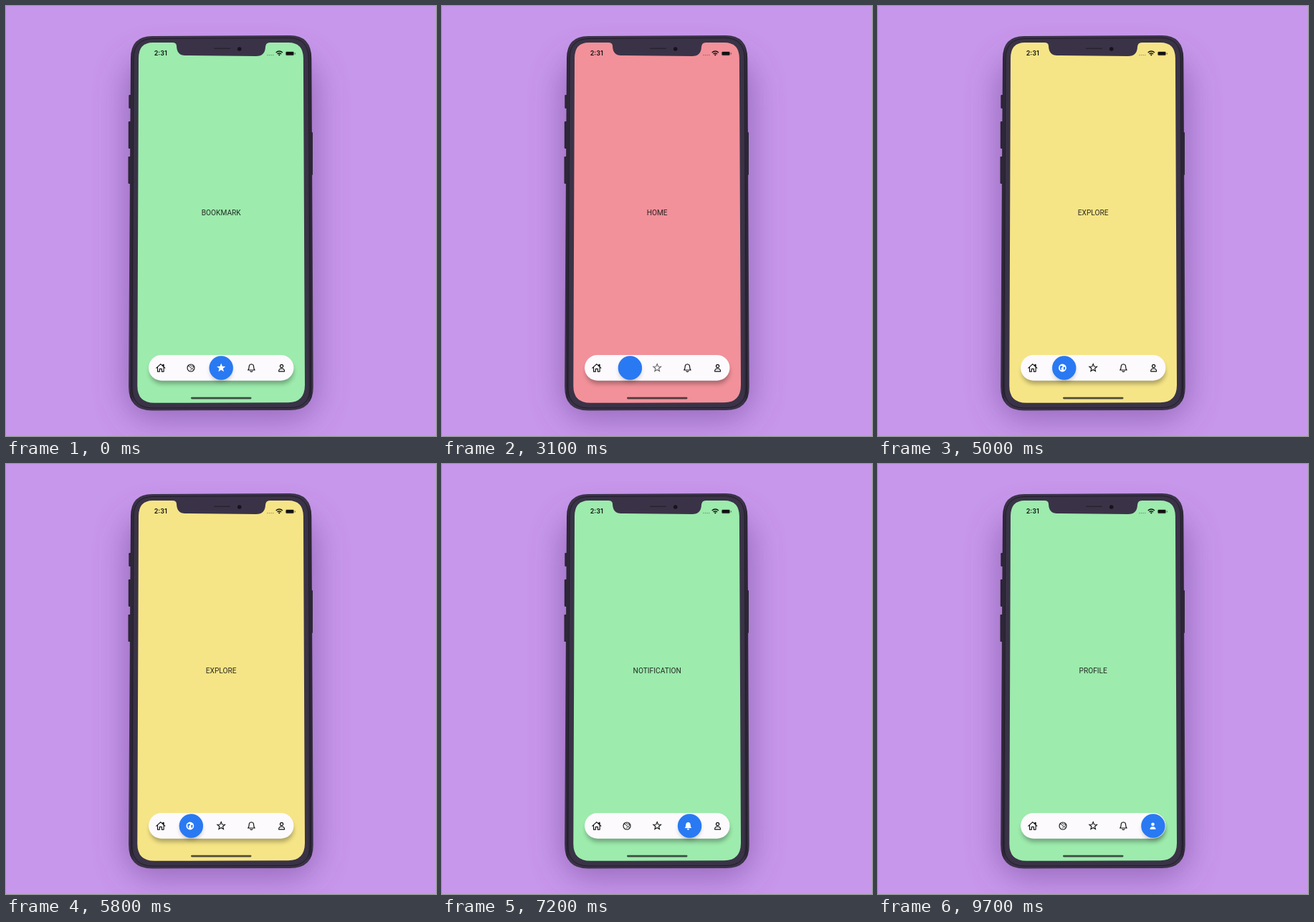
An HTML page that plays this animation: 600 by 600 pixels, repeating every 9800 ms.

```html
<!DOCTYPE html>
<html lang="en">
<head>
<meta charset="utf-8">
<title>Tab bar</title>
<style>
html, body { margin: 0; width: 100%; height: 100%; overflow: hidden; background: #c797eb; }
svg { display: block; width: 100vw; height: 100vh; }
#label { font: 10.2px Roboto, sans-serif; text-anchor: middle; fill: #111; fill-opacity: .88; }
#clock { font: 600 9px Inter, sans-serif; fill: #111; }
.line { fill: none; stroke: #111; stroke-width: 1.15; stroke-linejoin: round; stroke-linecap: round; }
.solid { fill: #fff; }
</style>
</head>
<body>
<svg viewBox="0 0 600 600">
  <defs>
    <filter id="blur" x="-50%" y="-30%" width="200%" height="160%"><feGaussianBlur stdDeviation="22"/></filter>
    <filter id="soft" x="-50%" y="-50%" width="200%" height="200%"><feGaussianBlur stdDeviation="3"/></filter>
    <linearGradient id="rim" x1="0" x2="1">
      <stop offset="0" stop-color="#4a4257"/><stop offset=".012" stop-color="#292332"/>
      <stop offset=".03" stop-color="#3a3347"/><stop offset=".97" stop-color="#3a3347"/>
      <stop offset=".988" stop-color="#292332"/><stop offset="1" stop-color="#463e52"/>
    </linearGradient>
  </defs>

  <rect width="600" height="600" fill="#c797eb"/>
  <rect x="166" y="72" width="268" height="506" rx="40" fill="#6a3f91" opacity=".5" filter="url(#blur)"/>

  <g fill="#2b2535">
    <rect x="171.3" y="124" width="5" height="19" rx="1.2"/>
    <rect x="170.8" y="161" width="5" height="38" rx="1.2"/>
    <rect x="170.5" y="210" width="5" height="38" rx="1.2"/>
    <rect x="423" y="176" width="5" height="60" rx="1.2"/>
  </g>
  <path fill="url(#rim)" d="M204 42 L396 41 Q426 41 426.3 73 L428.8 531 Q429 564 396 564 L204 564.5 Q171 564.5 171 531 L174 73 Q174 42 204 42Z"/>
  <path fill="none" stroke="#211c29" stroke-width="1" d="M205 45.5 L395 44.5 Q422 45 422.3 73 L424.6 531 Q424.5 560.5 396 560.5 L204 561 Q175.5 560.5 175.6 531 L178 73 Q178 46 205 45.5Z"/>

  <path id="screen" d="M205 51 L232 51 Q238 51 238 56 Q238.500 69 250 69 L349 70 Q361.500 70 362 57 Q362.500 51 368 51 L394 51 Q414.700 51 414.900 73 L417 529 Q416.800 553 394 553.300 L207 553.800 Q183.300 553.800 183.300 530 L185 73 Q185 51 205 51Z"/>
  <rect x="290" y="58.500" width="23" height="1.500" rx=".7" fill="#29222f"/>
  <circle cx="325.700" cy="60" r="2.800" fill="#17121f"/>

  <text id="clock" x="206.700" y="68.500">2:31</text>
  <g fill="#111">
    <g opacity=".35">
      <circle cx="365" cy="68.500" r=".8"/><circle cx="367.600" cy="68.500" r=".8"/>
      <circle cx="370.200" cy="68.500" r=".8"/><circle cx="372.800" cy="68.500" r=".8"/>
    </g>
    <g fill="none" stroke="#111" stroke-width="1.400">
      <path d="M376.700 65 Q381.300 60.800 385.900 65"/>
      <path d="M378.500 67 Q381.300 64.400 384.100 67"/>
    </g>
    <circle cx="381.300" cy="68.300" r="1.100"/>
    <rect x="389.900" y="63.400" width="12.200" height="5.800" rx="1.700" opacity=".4"/>
    <rect x="390.800" y="64" width="10.400" height="4.600" rx="1.100"/>
    <rect x="402.800" y="65.300" width="1" height="2.200" rx=".5" opacity=".6"/>
  </g>

  <text id="label" x="300.200" y="292.400"></text>

  <rect x="201" y="494" width="200" height="33" rx="16.500" opacity=".3" filter="url(#soft)"/>
  <rect x="199" y="487" width="202.500" height="35.700" rx="17.850" fill="#fcfafd"/>
  <g id="lines"></g>
  <g id="ball">
    <circle cy="4" r="15" opacity=".24" filter="url(#soft)"/>
    <circle r="16.700" fill="#2979f3"/>
  </g>
  <g id="solids"></g>
  <rect x="258" y="545.800" width="84.500" height="2.600" rx="1.300" fill="#222" opacity=".78"/>
</svg>
<script>
const LOOP = 9800, STEP = 100, GAP = 41.85;
const GREEN = '#9debad', RED = '#f2919a', YELLOW = '#f6e587';
const STAR = 'M' + Array.from({ length: 10 }, (_, i) => {
  const r = i % 2 ? 2.6 : 6, a = (i * 36 - 90) * Math.PI / 180;
  return (r * Math.cos(a)).toFixed(2) + ' ' + (r * Math.sin(a)).toFixed(2);
}).join('L') + 'Z';
const BELL = 'M-4.7 3 Q-3.3 1.600 -3.300 -1 Q-3.300 -4.900 0 -5.200 Q3.300 -4.900 3.300 -1 Q3.300 1.600 4.700 3Z';
const BODY = 'M-4 4.700 Q-4 .9 0 .9 Q4 .9 4 4.700Z';
const LAND = 'M-3.600 -2 Q-1.500 -3.600 .2 -2.800 L-.2 -1 -2 .2 -1.400 2 -2 3.400 Q-3.900 1.500 -3.600 -2Z M1.200 -1 L3.600 -1.600 Q4.300 1 2.400 3.200 L1.600 1.400Z';
const path = (d, extra = '') => `<path d="${d}" ${extra}/>`;

const tabs = [
  { name: 'HOME', color: RED,
    line: path('M-6 .2 L0 -5.300 6 .2 M-4.300 -1 V5.100 H-1.500 V1.300 H1.500 V5.100 H4.300 V-1 M3.200 -2.600 V-4.800 H4.300 V-1.600'),
    solid: path('M-6.300 .4 L0 -5.600 3 -2.700 V-4.800 H4.700 V-1.200 L6.300 .4 H4.500 V5.200 H1.500 V1.500 H-1.500 V5.200 H-4.500 V.4Z') },
  { name: 'EXPLORE', color: YELLOW, dx: -1.5,
    line: '<circle r="5"/>' + path('M-3.900 -2.600 L-1.800 -2.200 -1 -.6 1 .2 .6 2 -.4 3.200 M-1.400 -4 L.6 -2.600 2.800 -2.800 3.800 -1 2.200 .2 3 2.500', 'stroke-width=".8"'),
    solid: '<circle r="5.400"/>' + path(LAND, 'fill="#2979f3"') },
  { name: 'BOOKMARK', color: GREEN,
    line: path(STAR, 'transform="scale(.94)" stroke-linejoin="miter"'),
    solid: path(STAR, 'transform="scale(1.070)"') },
  { name: 'NOTIFICATION', color: GREEN,
    line: path(BELL) + path('M-1.500 4.600 Q0 6.200 1.500 4.600'),
    solid: path(BELL) + path('M-1.900 3.800 H1.900 Q1.400 5.700 0 5.700 Q-1.400 5.700 -1.900 3.800Z') },
  { name: 'PROFILE', color: GREEN, dx: -.4,
    line: '<circle cy="-2.500" r="2.100"/>' + path(BODY, 'transform="translate(0 .1)"'),
    solid: '<circle cy="-2.300" r="2.300"/>' + path(BODY) },
];
// [time, tab] of every tap
const taps = [[-2000, 2], [3010, 0], [4600, 1], [5813, 2], [6950, 3], [8200, 4]];

const $ = id => document.getElementById(id);
const slot = i => 300.2 + (i - 2) * 42.2;
const rest = i => 300.2 + (i - 2) * GAP;
const ramp = (t, a, b) => Math.min(1, Math.max(0, (t - a) / (b - a)));

const group = (kind, i) =>
  `<g class="${kind}" transform="translate(${slot(i)} 505)">${tabs[i][kind]}</g>`;
$('lines').innerHTML = tabs.map((_, i) => group('line', i)).join('');
$('solids').innerHTML = tabs.map((_, i) => group('solid', i)).join('');
const lines = [...$('lines').children], solids = [...$('solids').children];

// Underdamped step response, t in ms
function spring(t) {
  const w = .014, z = .6, d = w * Math.sqrt(1 - z * z);
  return 1 - Math.exp(-z * w * t) * (Math.cos(d * t) + z * w / d * Math.sin(d * t));
}

function draw(time) {
  let n = 0;
  while (n + 1 < taps.length && taps[n + 1][0] <= time) n++;
  const [start, now] = taps[n];
  const prev = n ? taps[n - 1][1] : now;
  const t = time - start;
  const x = rest(prev) + (rest(now) - rest(prev)) * spring(t);

  $('screen').setAttribute('fill', tabs[now].color);
  $('label').textContent = tabs[now].name;
  $('ball').setAttribute('transform', `translate(${x} 505)`);

  tabs.forEach((tab, i) => {
    const show = i === now ? ramp(t, 110, 200) : i === prev ? 1 - ramp(t, 0, 60) : 0;
    const lineShow = i === now ? 1 - ramp(t, 110, 200) : i === prev ? ramp(t, 0, 140) : 1;
    lines[i].setAttribute('opacity', lineShow);
    solids[i].setAttribute('opacity', show);
    const shift = i === now ? (x - rest(i)) * .4 : 0;
    solids[i].setAttribute('transform', `translate(${rest(i) + shift + (tab.dx || 0)} 505)`);
  });
}

let origin;
function tick(ms) {
  origin ??= ms;
  draw(Math.floor((ms - origin) % LOOP / STEP) * STEP);
  requestAnimationFrame(tick);
}
draw(0);
requestAnimationFrame(tick);
</script>
</body>
</html>
```
